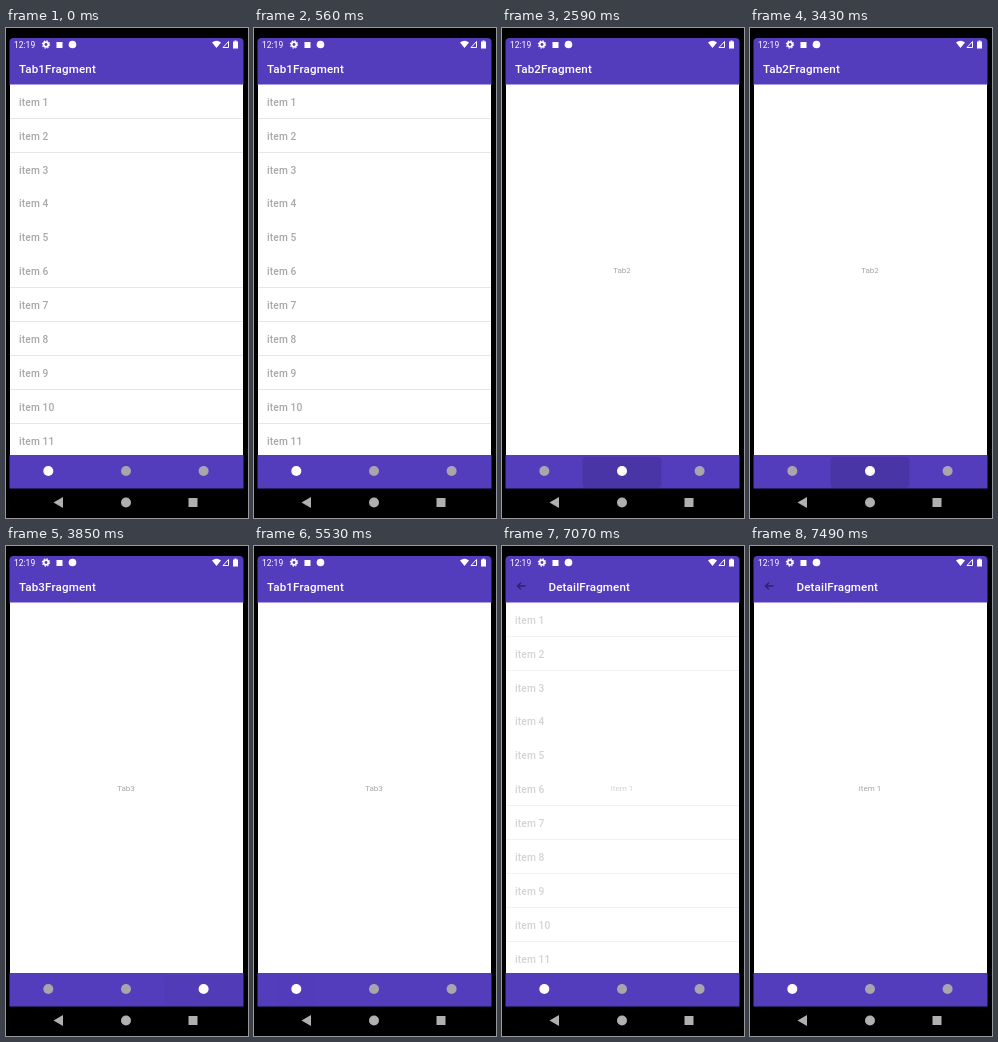
Animation, 242 px wide and 490 px high, one loop 8000 ms. Source, as an HTML page:

```html
<!DOCTYPE html>
<html lang="en">
<head>
<meta charset="utf-8">
<title>Tab navigation</title>
<style>
  html, body { margin: 0; width: 100%; height: 100%; overflow: hidden; background: #000; }
  svg { display: block; width: 242px; height: 490px; font-family: Roboto, sans-serif; }
  .title { font-size: 11.6px; font-weight: 500; letter-spacing: .15px; fill: #fff; }
  .row { font-size: 10.2px; font-weight: 500; letter-spacing: .15px; fill: #a8a8a8; }
  .label { font-size: 8px; fill: #a6a6a6; text-anchor: middle; }
  .clock { font-size: 8.5px; fill: #fff; }
</style>
</head>
<body>
<svg viewBox="0 0 242 490">
  <defs>
    <clipPath id="page"><rect x="4" y="56" width="233" height="371"/></clipPath>
    <clipPath id="bar"><rect x="3.5" y="427" width="234" height="33"/></clipPath>
  </defs>
  <rect width="242" height="490"/>
  <path d="M3.5 57V14q0-4 4-4H233.500q4 0 4 4V57z" fill="#543dbd"/>

  <text class="clock" x="8" y="19.800">12:19</text>
  <g fill="none" stroke="#fff">
    <circle cx="40" cy="16.500" r="2.300" stroke-width="1.700"/>
    <circle cx="40" cy="16.500" r="3.600" stroke-width="1.200" stroke-dasharray="1.400 1.427"/>
    <path d="M217 19.500H222.500V13.500z" stroke-width="1"/>
  </g>
  <g fill="#fff">
    <rect x="50.500" y="14" width="6" height="6"/>
    <circle cx="66.500" cy="16.500" r="3.800"/>
    <path d="M206 14.500Q210.500 11 215 14.500L210.500 20z"/>
    <path d="M227 13.500H228.500V12.500H230.500V13.500H232V20.500H227z"/>
  </g>

  <path id="back" d="M23.500 40H15.500M19 36.500L15.500 40L19 43.500" fill="none" stroke="#30206f" stroke-width="1.300"/>
  <text id="title" class="title" y="45"></text>

  <rect x="4" y="56.500" width="233" height="371" fill="#fff"/>
  <g clip-path="url(#page)">
    <g id="list"></g>
    <text id="old" class="label" x="120" y="245"></text>
    <text id="new" class="label" x="120" y="245"></text>
  </g>

  <rect x="3.500" y="427" width="234" height="33.500" fill="#543dbd"/>
  <g id="tabs" clip-path="url(#bar)"></g>

  <g fill="#b0b0b0">
    <path d="M47.500 474.500L57 469V480z"/>
    <circle cx="120" cy="474.500" r="5"/>
    <rect x="182.500" y="470" width="9" height="9"/>
  </g>
</svg>
<script>
const $ = id => document.getElementById(id);
const LOOP = 8000, STEP = 70;
const TAB_X = [42.3, 120, 197.6];

// start: content fade begins, fade: its length, touch: ripple begins
const pages = [
  { title: 'Tab1Fragment', tab: 0, list: true, start: 0, fade: 0 },
  { title: 'Tab2Fragment', tab: 1, label: 'Tab2', start: 2450, fade: 140, touch: 2450, shade: .13 },
  { title: 'Tab3Fragment', tab: 2, label: 'Tab3', start: 3570, fade: 280, touch: 3570, shade: .04 },
  { title: 'Tab1Fragment', tab: 0, list: true, start: 5530, fade: 350, touch: 5530, shade: .04, instant: true },
  { title: 'DetailFragment', tab: 0, label: 'item 1', start: 7000, fade: 140, back: true }
];

let rows = '';
for (let i = 0; i < 11; i++) {
  const y = 77.7 + i * 33.9;
  rows += `<text class="row" x="13" y="${y}">item ${i + 1}</text>`;
  if (i < 2 || i > 4) {
    rows += `<rect x="4" y="${Math.round(y + 12.2)}" width="233" height="1" fill="#e6e6e6"/>`;
  }
}
$('list').innerHTML = rows;

$('tabs').innerHTML = '<rect id="ripple" y="429" height="31"/>' +
  TAB_X.map(x => `<circle class="icon" cx="${x}" cy="443" r="5"/>`).join('');
const icons = document.querySelectorAll('.icon');

function draw(time) {
  const t = Math.floor(time % LOOP / STEP) * STEP;
  let i = pages.length - 1;
  while (pages[i].start > t) i--;

  const page = pages[i], prev = pages[i - 1] || page;
  const age = t - page.start;
  const mix = page.fade ? Math.min(1, age / page.fade) : 1;
  const head = age > 0 || page.instant || !i ? page : prev;

  $('title').textContent = head.title;
  $('title').setAttribute('x', head.back ? 46.5 : 13);
  $('back').style.opacity = head.back ? 1 : 0;

  $('list').style.opacity = page.list ? mix : prev.list ? 1 - mix : 0;
  $('old').textContent = prev.label || '';
  $('old').style.opacity = 1 - mix;
  $('new').textContent = page.label || '';
  $('new').style.opacity = mix;

  icons.forEach((icon, n) => icon.setAttribute('fill', n === head.tab ? '#fff' : '#aaa4ad'));

  const ripple = $('ripple');
  let shade = 0;
  if (page.touch) {
    const grow = Math.min(1, (t - page.touch) / 140);
    const half = 20 + 19.5 * grow;
    ripple.setAttribute('x', TAB_X[page.tab] - half);
    ripple.setAttribute('width', half * 2);
    ripple.setAttribute('rx', 4);
    shade = page.shade * (.3 + .7 * grow);
    if (page.instant) shade *= 1 - mix;
  }
  ripple.style.opacity = shade;
}

const origin = performance.now();
function tick() {
  draw(performance.now() - origin);
  requestAnimationFrame(tick);
}
tick();
</script>
</body>
</html>
```
